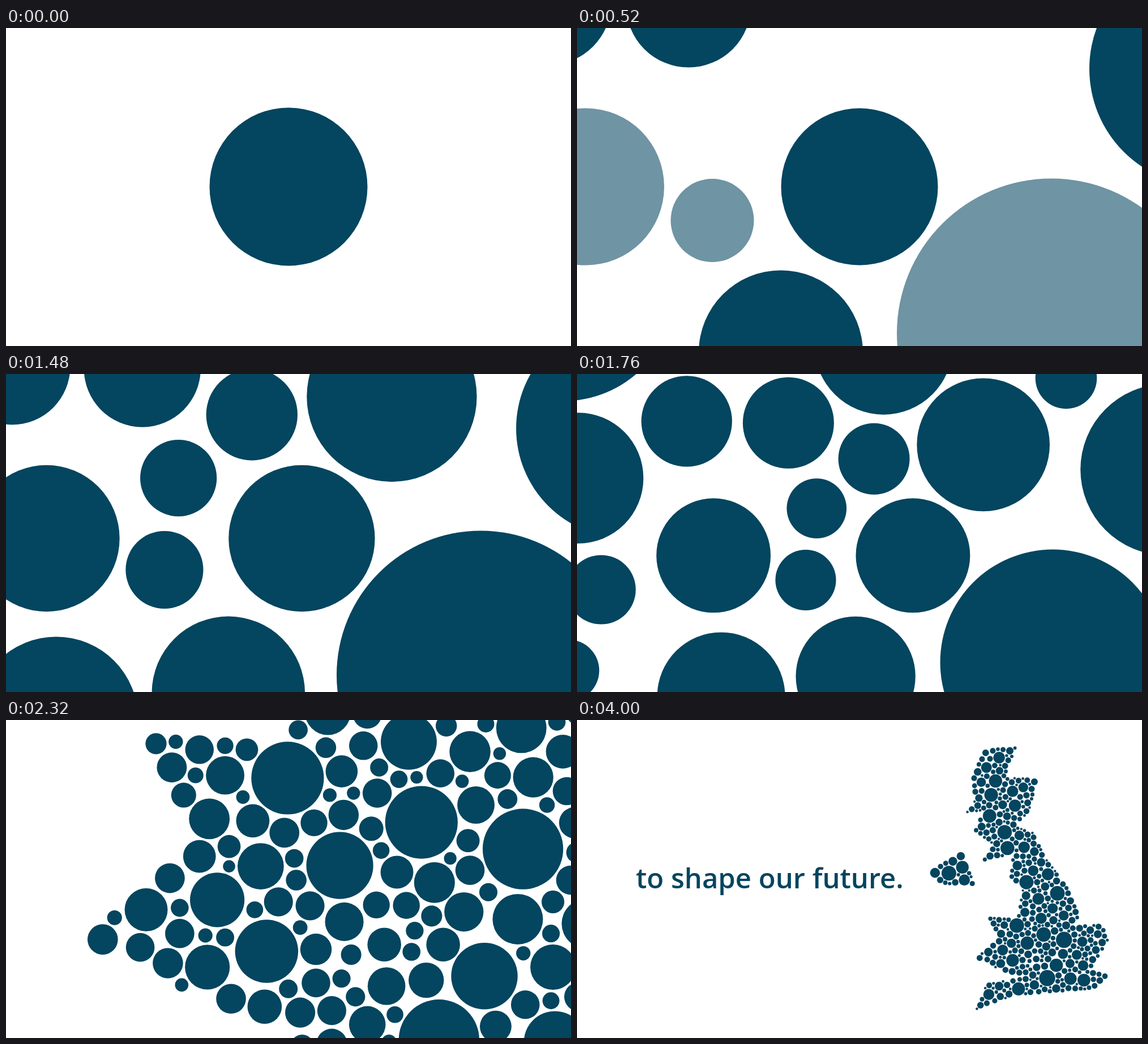
Recreate the animation shown at these times as an HTML page with a canvas. Size 998 by 561 pixels, loop 4040 ms.

```html
<!DOCTYPE html>
<html lang="en">
<head>
<meta charset="utf-8">
<title>To shape our future</title>
<style>
  html, body { margin: 0; width: 100%; height: 100%; overflow: hidden; background: #fff; }
  canvas { display: block; }
</style>
</head>
<body>
<canvas id="stage" width="998" height="561"></canvas>
<script>
const LOOP = 4040, STEP = 40;
const INK = '#04455f';
const FOCUS = { x: 847, y: 428 };        // the camera zooms about this point
const MID = 0.2147, FAR = 0.04316;       // zoom levels the shapes below are measured at
const ZOOM = { start: 1240, length: 1480 };
const FADE = 280;

// Circles of the close view by the time they start to fade in: x, y, radius at zoom 1.
const center = [499, 280, 138.5];
const opening = {
  80: [[-49.5, -45, 110], [197, -41, 110.5], [1112, 72, 207], [360, 572.5, 145]],
  360: [[15.5, 280, 138.5], [239, 339.5, 73.5], [838, 538.5, 273]],
  560: [[265.5, 166, 72.5], [669.5, 12, 161]],
  680: [[34, 621, 155]],
  800: [[404.5, 46, 86.5]]
};

// Their neighbours and a few large ones, at zoom MID.
const neighbours = [
  [757, 287, 36], [598, 356, 34], [610, 414, 18], [593, 456, 16], [852, 304, 16],
  [498, 103, 64], [734, 181, 64], [913, 228, 71], [590, 257, 59], [765, 564, 71]
];

// Coastlines at zoom FAR.
const mainland = [
  [719, 50], [778, 46], [758, 100], [816, 102], [800, 162], [776, 187], [808, 198],
  [830, 244], [868, 294], [889, 344], [882, 360], [930, 359], [940, 390], [909, 440],
  [943, 450], [914, 476], [770, 488], [702, 514], [722, 464], [790, 452], [762, 449],
  [701, 421], [742, 385], [724, 346], [776, 349], [786, 298], [763, 280], [768, 238],
  [712, 252], [733, 220], [700, 196], [714, 162], [684, 165], [700, 146], [696, 98]
];
const island = [[617, 268], [682, 229], [705, 294], [643, 291]];

const clamp01 = v => Math.min(1, Math.max(0, v));
const progress = (t, start, length) => clamp01((t - start) / length);
const smooth = u => u * u * (3 - 2 * u);
const random = i => Math.abs(Math.sin(i * 12.9898 + 4) * 43758.5453) % 1;

// Rescale a circle about the focus.
const rescale = ([x, y, r], k) =>
  [FOCUS.x + (x - FOCUS.x) * k, FOCUS.y + (y - FOCUS.y) * k, r * k];

// Distance from a point to the outline, negative outside it.
function depth(x, y, outline) {
  let nearest = Infinity, inside = false;
  let [ax, ay] = outline[outline.length - 1];
  for (const [bx, by] of outline) {
    const dx = bx - ax, dy = by - ay;
    const u = clamp01(((x - ax) * dx + (y - ay) * dy) / (dx * dx + dy * dy));
    const ex = x - ax - u * dx, ey = y - ay - u * dy;
    nearest = Math.min(nearest, ex * ex + ey * ey);
    if (ay > y !== by > y && x < ax + dx * (y - ay) / dy) inside = !inside;
    ax = bx;
    ay = by;
  }
  return inside ? Math.sqrt(nearest) : -1;
}

// Distance to the block around the focus that is already complete.
function fromCore(x, y) {
  const dx = Math.max(797 - x, 0, x - 856), dy = Math.max(402.5 - y, 0, y - 436);
  return Math.hypot(dx, dy);
}

// Scatter large circles, then close the gaps with the largest that still fit.
function pack(outline, placed, largeCount) {
  const MIN = 2.1, GAP = 0.75, GRID = 0.7;
  const xs = outline.map(p => p[0]), ys = outline.map(p => p[1]);
  const right = Math.max(...xs), bottom = Math.max(...ys);
  const shrink = (s, [x, y, r]) => {
    const dx = s.x - x, dy = s.y - y;
    s.room = Math.min(s.room, Math.sqrt(dx * dx + dy * dy) - r - GAP);
  };
  let spots = [];
  for (let y = Math.min(...ys); y < bottom; y += GRID) {
    for (let x = Math.min(...xs); x < right; x += GRID) {
      const s = { x, y, room: fromCore(x, y) };
      if (s.room < MIN) continue;
      s.room = Math.min(s.room, depth(x, y, outline));
      for (const c of placed) shrink(s, c);
      if (s.room >= MIN) spots.push(s);
    }
  }
  const added = [];
  while (spots.length) {
    const i = added.length;
    const cap = 5 + 8 * Math.exp(-i / largeCount);
    const score = s => s.room <= cap ? s.room : cap - (s.room - cap) * 0.01;
    const roomy = i < 2 * largeCount ? spots.filter(s => s.room >= cap) : [];
    let best = spots[0];
    if (roomy.length) best = roomy[Math.floor(random(i) * roomy.length)];
    else for (const s of spots) if (score(s) > score(best)) best = s;
    const circle = [best.x, best.y, Math.min(best.room, cap)];
    added.push(circle);
    for (const s of spots) shrink(s, circle);
    spots = spots.filter(s => s.room >= MIN);
  }
  return added;
}

const known = [
  ...[center, ...Object.values(opening).flat()].map(c => rescale(c, FAR)),
  ...neighbours.map(c => rescale(c, FAR / MID))
];
const packed = [...pack(mainland, known, 35), ...pack(island, known, 4)];
const surroundings = [
  ...neighbours.map(c => rescale(c, 1 / MID)),
  ...packed.map(c => rescale(c, 1 / FAR))
];

const ctx = document.getElementById('stage').getContext('2d');

function disc([x, y, r]) {
  ctx.beginPath();
  ctx.arc(x, y, r, 0, 2 * Math.PI);
  ctx.fill();
}

function draw(t) {
  const zoom = 1 - (1 - FAR) * smooth(progress(t, ZOOM.start, ZOOM.length));
  ctx.globalAlpha = 1;
  ctx.fillStyle = '#fff';
  ctx.fillRect(0, 0, 998, 561);
  ctx.fillStyle = INK;

  const [x, y, r] = center;
  disc(rescale([x, y, r + 1 - progress(t, 80, FADE)], zoom));
  for (const c of surroundings) disc(rescale(c, zoom));
  for (const [start, circles] of Object.entries(opening)) {
    ctx.globalAlpha = progress(t, Number(start), FADE);
    for (const c of circles) disc(rescale(c, zoom));
  }

  ctx.globalAlpha = progress(t, 2600, FADE);
  ctx.font = '600 49px "Open Sans", "Noto Sans", sans-serif';
  ctx.fillText('to shape our future.', 104, 297);
}

function tick() {
  const t = performance.now() % LOOP;
  draw(Math.floor(t / STEP) * STEP);
  requestAnimationFrame(tick);
}
tick();
</script>
</body>
</html>
```
